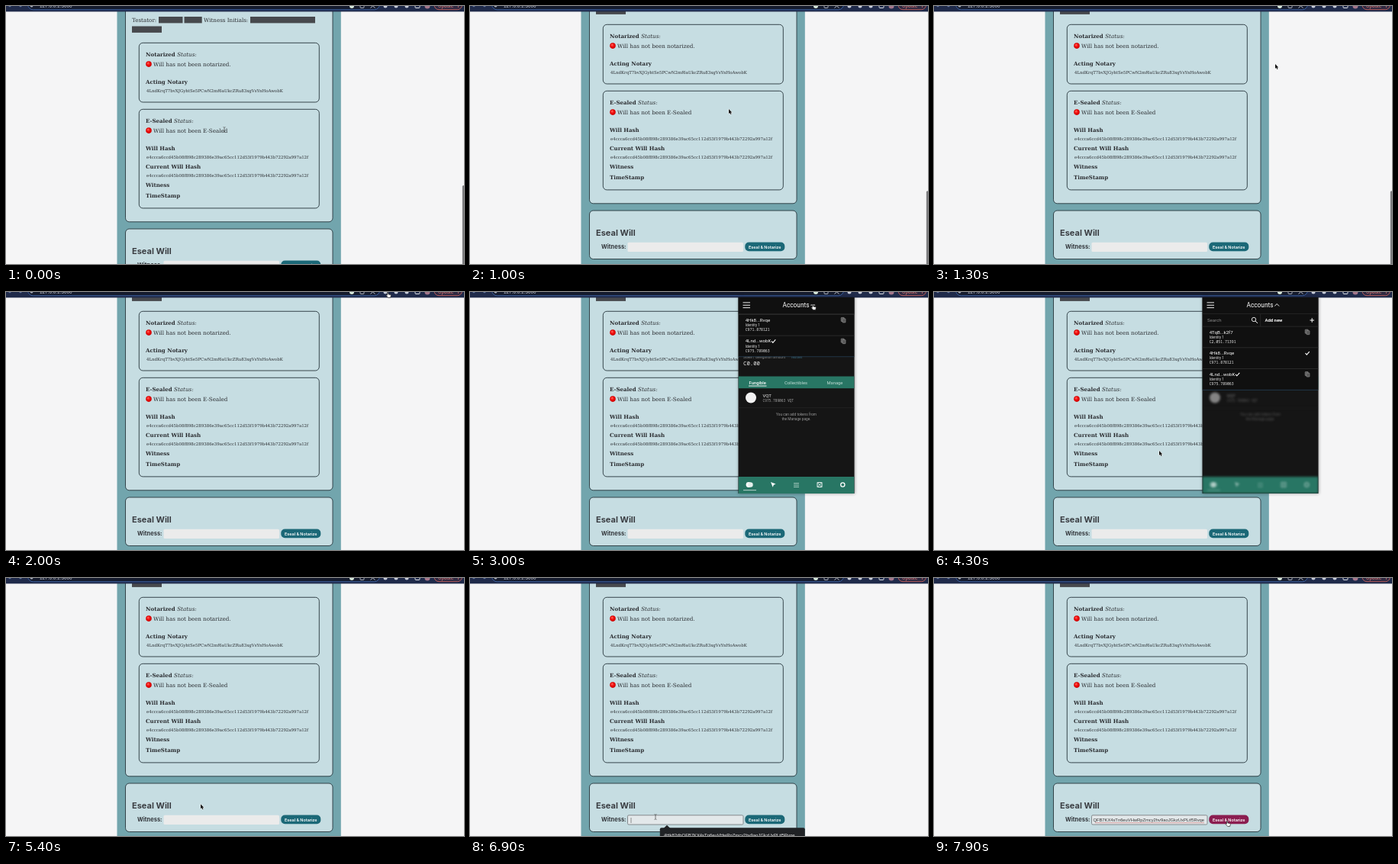
Write an HTML page with a canvas that moves like this. It is 600 by 338 pixels and loops after 8 s.

```html
<!DOCTYPE html>
<html lang="en">
<head>
<meta charset="utf-8">
<title>Eseal Will</title>
<style>
html, body { margin: 0; width: 100%; height: 100%; overflow: hidden; background: #f5f5f6; }
canvas { display: block; width: 600px; height: 338px; }
</style>
</head>
<body>
<canvas id="stage"></canvas>
<script>
const LOOP = 8000;
const canvas = document.getElementById('stage');
const ctx = canvas.getContext('2d');
const ratio = window.devicePixelRatio || 1;
canvas.width = 600 * ratio;
canvas.height = 338 * ratio;

const SLAB = '"DejaVu Serif", serif';
const UI = 'Inter, sans-serif';
const ARIAL = '"Liberation Sans", sans-serif';
const ROBOTO = 'Roboto, sans-serif';
const MONO = '"Noto Sans Mono", monospace';
const INK = '#2c2e32', CARD = '#c6dde2', BORDER = '#26353c', GREEN = '#287664';

const WILL_HASH = 'e4ccca6ccd45b08f898c289386e39ac65cc112d53f1979b443b72292a997a12f';
const NOTARY = '4LndKrqT7bvXJGyhtSe5PCwN2mf6aUkcZRu83xgVsYnHoAwobK';
const WITNESS_TAIL = 'QFB7KX4sTn6euVHwRpZmcy2hv9aoJGkzUxPLtf5Rvqe';
const WITNESS = '4Hk82db' + WITNESS_TAIL;
const ACCOUNTS = [
  ['4TqB...k2f7', 'C2,051.71391'],
  ['4Hk8...Rvqe', 'C971.878121'],
  ['4Lnd...wobK', 'C975.789063']
];

const POPUP = { open: 2250, close: 4600 };
const FOCUS = 5800, PASTE = 7150, HOVER = 7500;

// time, x, y, pointer shape used until the next stop
const POINTER = [
  [0, 286, 162, 'beam'], [550, 286, 162, 'arrow'], [800, 330, 140, 'arrow'],
  [950, 330, 140, 'arrow'], [1250, 447, 76, 'arrow'], [1450, 447, 76, 'arrow'],
  [1950, 499, 0, 'hand'], [2300, 499, 0, 'hand'], [2700, 448, 16, 'hand'],
  [3050, 448, 16, 'hand'], [3450, 488, 77, 'hand'], [3800, 488, 77, 'arrow'],
  [4250, 295, 208, 'arrow'], [4500, 295, 208, 'arrow'], [5100, 258, 292, 'arrow'],
  [5300, 258, 292, 'arrow'], [5650, 243, 313, 'beam'], [7150, 243, 313, 'arrow'],
  [7650, 382, 317, 'hand'], [7800, 383, 318, 'hand'], [8000, 383, 318, 'hand']
];

const progress = (t, from, to) => Math.min(1, Math.max(0, (t - from) / (to - from)));
const smooth = p => p * p * (3 - 2 * p);

function rect(x, y, w, h, color) {
  ctx.fillStyle = color;
  ctx.fillRect(x, y, w, h);
}

function box(x, y, w, h, radius, fill, stroke, width = 0.9) {
  ctx.beginPath();
  ctx.roundRect(x, y, w, h, radius);
  if (fill) { ctx.fillStyle = fill; ctx.fill(); }
  if (stroke) { ctx.strokeStyle = stroke; ctx.lineWidth = width; ctx.stroke(); }
}

function dot(x, y, r, color) {
  ctx.beginPath();
  ctx.arc(x, y, r, 0, 7);
  ctx.fillStyle = color;
  ctx.fill();
}

function line(points, color, width = 1) {
  ctx.beginPath();
  for (let i = 0; i < points.length; i += 2) ctx.lineTo(points[i], points[i + 1]);
  ctx.strokeStyle = color;
  ctx.lineWidth = width;
  ctx.stroke();
}

function text(str, x, y, font, color = INK, align = 'left') {
  ctx.font = font;
  ctx.fillStyle = color;
  ctx.textAlign = align;
  ctx.fillText(str, x, y);
}

function clip(x, y, w, h) {
  ctx.save();
  ctx.beginPath();
  ctx.rect(x, y, w, h);
  ctx.clip();
}

const heading = (str, y) => text(str, 183, y, `bold 7.05px ${SLAB}`);
const body = (str, x, y) => text(str, x, y, `7.15px ${SLAB}`);
const hash = (str, y) => text(str, 184, y, `5.45px ${SLAB}`);

function statusBlock(title, message, y) {
  heading(title, y);
  const width = ctx.measureText(title + ' ').width;
  text('Status:', 183 + width, y, `italic 7.15px ${SLAB}`);
  const shade = ctx.createRadialGradient(186, y + 8.5, 0.5, 187, y + 9.9, 3.8);
  shade.addColorStop(0, '#ff5a50');
  shade.addColorStop(0.5, '#f00b0b');
  shade.addColorStop(1, '#c90000');
  dot(187, y + 9.9, 3.8, shade);
  body(message, 193, y + 12.6);
}

function drawForm(t) {
  box(156.5, 269, 271.5, 63.5, 5, CARD, BORDER);
  text('Eseal Will', 165, 301.7, `bold 11px ${UI}`, '#3a3d42');
  text('Witness:', 172, 319, `bold 7.5px ${UI}`, '#33363b');
  const focused = t >= FOCUS;
  box(206.5, 310.8, 151.5, 12.2, 1.5, focused ? '#e3e8ea' : '#ebebeb', focused ? '#7b8084' : null);
  if (t >= PASTE) {
    text(WITNESS_TAIL, 354, 319, `5.8px ${ARIAL}`, '#333', 'right');
    line([211, 320.7, 354, 320.7], '#cf6a6a', 0.6);
  } else if (focused && (t - FOCUS) % 1000 < 500 || t >= 6850 && t < PASTE) {
    rect(210.6, 314, 0.8, 7, '#777');
  }
  box(360.3, 310.5, 52, 11.8, 5, t >= HOVER ? '#8b1d50' : '#1b6877');
  text('Eseal & Notarize', 386.3, 318.5, `600 5.4px ${UI}`, '#fff', 'center');
}

function drawPage(t) {
  const pull = 1 - progress(t, 50, 400);
  const offset = 24 * pull * pull - 1 + smooth(progress(t, 1450, 1700));
  rect(0, 0, 600, 338, '#f5f5f6');
  rect(145.5, 0, 293.3, 338, '#72a5ad');
  ctx.save();
  ctx.translate(0, offset);
  box(156.5, -60, 271.5, 319.8, 5, CARD, BORDER);
  body('Testator:', 165, -2);
  body('Witness Initials:', 259, -2);
  for (const [x, y, w] of [[200, -9, 31.5], [233.5, -9, 23.2], [320, -9, 85], [165, 3.5, 39]])
    rect(x, y, w, 8.4, '#47494d');

  box(174.3, 25.3, 236, 77.7, 5, null, BORDER);
  statusBlock('Notarized', 'Will has not been notarized.', 43.2);
  heading('Acting Notary', 78.8);
  hash(NOTARY, 90);

  box(174.3, 112.3, 236, 129.6, 5, null, BORDER);
  statusBlock('E-Sealed', 'Will has not been E-Sealed', 130.2);
  heading('Will Hash', 166);
  hash(WILL_HASH, 177.2);
  heading('Current Will Hash', 190.2);
  hash(WILL_HASH, 201.2);
  heading('Witness', 214.2);
  heading('TimeStamp', 228);
  drawForm(t);
  ctx.restore();
  ctx.globalAlpha = 1 - progress(t, 1500, 1750);
  box(597.8, 242 - offset * 0.3, 3, 110, 1.5, '#7c7c7e');
  ctx.globalAlpha = 1;
}

function drawToolbar() {
  rect(0, 0, 600, 7.4, '#1f2a4a');
  box(28.5, -12, 461, 16.8, 7, '#151b2d', '#4068ad');
  text('127.0.0.1:3000', 44, 2, `6.4px ${ARIAL}`, '#c8ccd6');
  dot(5, -0.5, 1.8, '#63769e');
  dot(19, -0.5, 1.8, '#63769e');
  dot(33.5, -0.5, 2, '#aab0be');
  dot(453, 0, 3, '#d8eadc');
  box(464, -4, 5, 6.5, 1, null, '#cfd3dd', 0.8);
  line([477.5, 2.5, 480.5, 0, 483.5, 2.5], '#cfd3dd', 0.9);
  [497, 511, 525].forEach(x => dot(x, 0, 2.5, '#c9cedb'));
  box(536, -4, 6, 6.5, 1, null, '#dfe2e8', 1);
  dot(552, 0, 3.5, '#a5778b');
  box(561, -8, 36.5, 12.7, 6, '#302a42', '#d8665f', 0.8);
  text('Update', 566, 2, `6.3px ${ARIAL}`, '#e57f78');
  dot(592.5, 1, 0.7, '#e57f78');
}

function drawCopyIcon(x, y) {
  box(x - 2.8, y - 3, 4, 5, 0.5, '#555', '#999', 0.6);
  box(x - 1, y - 1.5, 4, 5, 0.5, '#555', '#999', 0.6);
}

const drawCheck = (x, y) => line([x - 2.5, y, x - 0.7, y + 1.9, x + 2.8, y - 2], '#fff', 1.1);

function drawWallet(blur) {
  const dim = 1 - 0.5 * blur;
  if (blur > 0) ctx.filter = `blur(${1.4 * blur * ratio}px)`;
  text('4Lnd...wobK', 358, 40, `6px ${ROBOTO}`, '#eee');
  text('Identity 1', 358, 47, `4.6px ${ROBOTO}`, '#aaa');
  text('C975.789063', 358, 63, `7.3px ${MONO}`, '#eee');
  text('At disposal', 358, 71, `4.7px ${ROBOTO}`, '#888');
  text('Stake / delegation amount', 358, 86.5, `4.7px ${ROBOTO}`, '#888');
  text('Testnet', 420, 86.5, `4.5px ${ROBOTO}`, '#3e7187');
  text('C0.00', 358, 95.7, `7.3px ${MONO}`, '#eee');
  rect(351.5, 110.5, 152, 15.7, GREEN);
  [['Fungible', 376.7], ['Collectibles', 427], ['Manage', 478]].forEach(([label, x], i) =>
    text(label, x, 120.5, `${i ? '' : '500 '}5.8px ${ROBOTO}`, i ? '#c2ddd6' : '#fff', 'center'));
  rect(365, 122.6, 23.5, 0.9, '#fff');
  ctx.globalAlpha = dim;
  dot(368, 138.5, 7, '#f2f2f2');
  text('VQT', 383.5, 138, `6px ${ROBOTO}`, '#eee');
  text('C975.789063 VQT', 383.5, 144, `4.5px ${MONO}`, '#aaa');
  rect(351.5, 151.5, 152, 0.6, '#292929');
  text('You can add tokens from', 427.5, 161.8, `4.8px ${ROBOTO}`, '#999', 'center');
  text('the Manage page.', 427.5, 167.8, `4.8px ${ROBOTO}`, '#999', 'center');
  ctx.globalAlpha = 1;
  rect(351.5, 242, 152, 22, GREEN);
  ctx.globalAlpha = dim;
  dot(365, 252.5, 3.4, '#fff');
  dot(367.5, 252.5, 3.2, '#e4f0ec');
  ctx.beginPath();
  [[394, 249], [400.5, 251.5], [397.8, 252.7], [396.7, 255.7]].forEach(p => ctx.lineTo(...p));
  ctx.fillStyle = '#fff';
  ctx.fill();
  [250.3, 252.6, 254.9].forEach(y => rect(424, y, 7, 0.8, '#c3ded5'));
  box(455, 249.5, 6, 6, 0.5, null, '#fff', 0.9);
  line([455, 249.5, 461, 255.5], '#fff', 0.8);
  line([461, 249.5, 455, 255.5], '#fff', 0.8);
  ctx.beginPath();
  ctx.arc(488.3, 252.5, 2.6, 0, 7);
  ctx.strokeStyle = '#fff';
  ctx.lineWidth = 1.3;
  ctx.stroke();
  rect(358, 259.3, 17, 0.8, '#d9e9e4');
  ctx.globalAlpha = 1;
  ctx.filter = 'none';
}

function drawAccountList(t, slide) {
  ctx.save();
  ctx.translate(0, -99 * (1 - slide));
  rect(351.5, 28.5, 152, 99.5, '#101010');
  text('Search', 358, 39, `6px ${ROBOTO}`, '#888');
  ctx.beginPath();
  ctx.arc(419, 36, 2.7, 0, 7);
  ctx.strokeStyle = '#eee';
  ctx.lineWidth = 0.9;
  ctx.stroke();
  line([421, 38, 424, 41], '#eee');
  rect(427.5, 29, 0.6, 16, '#333');
  text('Add new', 433.5, 39, `bold 5.9px ${ROBOTO}`, '#fff');
  line([492.5, 37, 498, 37], '#fff');
  line([495.2, 34.2, 495.2, 39.8], '#fff');
  rect(351.5, 44.8, 152, 0.6, '#333');
  ACCOUNTS.forEach(([name, amount], i) => {
    const y = 54.5 + i * 27.7;
    text(name, 360.7, y, `6.1px ${ROBOTO}`, '#fff');
    if (i === 2) drawCheck(397.5, y - 2);
    text('Identity 1', 360.7, y + 6.2, `4.7px ${ROBOTO}`, '#ddd');
    text(amount, 360.7, y + 12.1, `4.85px ${MONO}`, '#eee');
    if (i === 1 && t >= 3600) drawCheck(489, y - 2);
    else drawCopyIcon(489, y - 2.3);
    rect(351.5, y + 18, 152, 0.7, i === 2 ? '#27425a' : '#333');
  });
  ctx.restore();
}

function drawPopup(t) {
  if (t < POPUP.open || t >= POPUP.close) return;
  const slide = progress(t, 2900, 3080);
  ctx.save();
  ctx.shadowColor = 'rgba(0,0,0,.4)';
  ctx.shadowBlur = 4 * ratio;
  rect(351.5, 7, 152, 257, '#151515');
  ctx.restore();
  clip(351.5, 7, 152, 257);
  drawWallet(progress(slide, 0.6, 1));
  if (slide > 0) drawAccountList(t, slide);
  rect(351.5, 7, 152, 21.5, '#101010');
  rect(351.5, 28.2, 152, 0.6, '#2c2c2c');
  [13.4, 16.8, 20.2].forEach(y => rect(357.5, y, 9.5, 0.9, '#fff'));
  text('Accounts', 427, 19.8, `8.3px ${ROBOTO}`, '#fff', 'center');
  const fold = 1.5 - 3 * slide;
  line([446.3, 17 - fold, 449.2, 17 + fold, 452.1, 17 - fold], '#fff', 0.9);
  ctx.restore();
}

function drawSuggestion(t) {
  if (t < FOCUS || t >= PASTE) return;
  box(248.8, 327.3, 190, 20, 2, '#202225');
  ctx.beginPath();
  [[253.5, 328], [258, 323.8], [262.5, 328]].forEach(p => ctx.lineTo(...p));
  ctx.fill();
  text(WITNESS, 254, 339, `5.9px ${ARIAL}`, '#f0f0f0');
}

const pointerShapes = {
  beam() {
    line([-1.5, -3.5, 0, -2.8, 1.5, -3.5], '#444', 0.6);
    line([0, -2.8, 0, 2.8], '#444', 0.7);
    line([-1.5, 3.5, 0, 2.8, 1.5, 3.5], '#444', 0.6);
  },
  arrow() {
    const path = new Path2D('M0 0V6L1.4 4.8L2.4 7L3.5 6.5L2.5 4.4H4.3Z');
    ctx.strokeStyle = '#fff';
    ctx.lineWidth = 1;
    ctx.stroke(path);
    ctx.fillStyle = '#111';
    ctx.fill(path);
  },
  hand() {
    const path = new Path2D('M.4.6Q1.2-.2 1.8.7V3L4.8 3.6Q5.6 4 5.2 5.2L4.7 7.4H1.6L-.9 4.6Q-1 3.6.4 4.2Z');
    ctx.fillStyle = '#fff';
    ctx.fill(path);
    ctx.strokeStyle = '#222';
    ctx.lineWidth = 0.7;
    ctx.stroke(path);
  }
};

function drawPointer(t) {
  const next = POINTER.findIndex(stop => stop[0] > t);
  const [t0, x0, y0, shape] = POINTER[next - 1];
  const [t1, x1, y1] = POINTER[next];
  const p = smooth(progress(t, t0, t1));
  ctx.save();
  ctx.translate(x0 + (x1 - x0) * p, y0 + (y1 - y0) * p);
  pointerShapes[shape]();
  ctx.restore();
}

function frame(now) {
  const t = now % LOOP;
  ctx.setTransform(ratio, 0, 0, ratio, 0, 0);
  drawPage(t);
  drawToolbar();
  drawPopup(t);
  drawSuggestion(t);
  drawPointer(t);
  requestAnimationFrame(frame);
}
requestAnimationFrame(frame);
</script>
</body>
</html>
```
